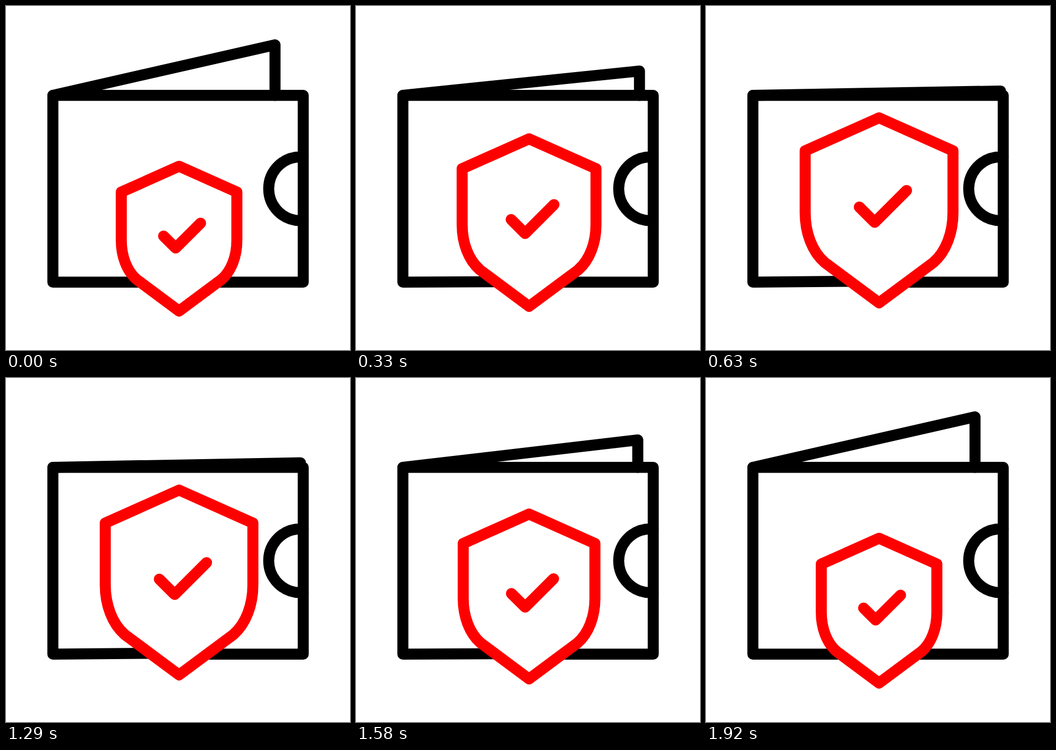
These frames come from a looping animation (640 by 640 pixels, 2.04 s). An HTML page:

```html
<!DOCTYPE html>
<html lang="en">
<head>
<meta charset="utf-8">
<title>Protected wallet</title>
<style>
  html, body { margin: 0; width: 100%; height: 100%; overflow: hidden; background: #fff; }
  svg { display: block; width: 100%; height: 100%; }
  path { fill: none; stroke: #000; stroke-width: 20.5; stroke-linecap: round; stroke-linejoin: round; }
  .red { stroke: #f00; }
  #shield { fill: #fff; }
</style>
</head>
<body>
<svg viewBox="0 0 640 640">
  <path id="flap"/>
  <path id="wallet"/>
  <path d="M553 280.7H548A59.3 59.3 0 0 0 548 399.3H553"/>
  <path id="shield" class="red"/>
  <path id="tick" class="red"/>
</svg>
<script>
const LOOP = 2040, FRAME = 1000 / 24;
const [flap, wallet, shield, tick] =
  ['flap', 'wallet', 'shield', 'tick'].map(id => document.getElementById(id));

const mix = (a, b, k) => a + (b - a) * k;

// cubic-bezier(.5, 0, .5, 1)
function ease(x) {
  if (x <= 0) return 0;
  if (x >= 1) return 1;
  let lo = 0, hi = 1;
  for (let i = 0; i < 30; i++) {
    const u = (lo + hi) / 2;
    if (1.5 * u * (1 - u) + u ** 3 < x) lo = u; else hi = u;
  }
  return lo * lo * (3 - 2 * lo);
}

function draw(ms) {
  // The motion is stepped at 24 poses a second.
  const n = Math.floor((ms % LOOP + 4.9) / FRAME);
  const k = ease(n / 15) - ease((n - 30) / 16);

  const x = mix(500.5, 548, k), y = mix(72.3, 158.2, k);
  flap.setAttribute('d', `M87.2 166.2L${x} ${y}V166.2`);
  wallet.setAttribute('d',
    `M270 ${513.8 - 1.6 * k}L87.2 513.8V166.2H553V513.8H322`);

  // Shield points are measured from its top corner.
  const size = mix(1, 1.279, k), top = mix(298.2, 208, k);
  const p = (px, py) => `${322 + px * size} ${top + py * size} `;
  const side = s => `C${p(s * 107.5, 167)}${p(s * 97.5, 194.5)}`;
  shield.setAttribute('d',
    `M${p(0, 0)}L${p(107.5, 48)}L${p(107.5, 138)}` +
    side(1) + p(79, 210.5) + `L${p(0, 269.2)}L${p(-79, 210.5)}` +
    `C${p(-97.5, 194.5)}${p(-107.5, 167)}${p(-107.5, 138)}L${p(-107.5, 48)}Z`);
  tick.setAttribute('d', `M${p(-28.8, 129.7)}L${p(-6.4, 152)}L${p(40, 105.7)}`);
}

const start = performance.now();
function loop() {
  draw(performance.now() - start);
  requestAnimationFrame(loop);
}
loop();
</script>
</body>
</html>
```
